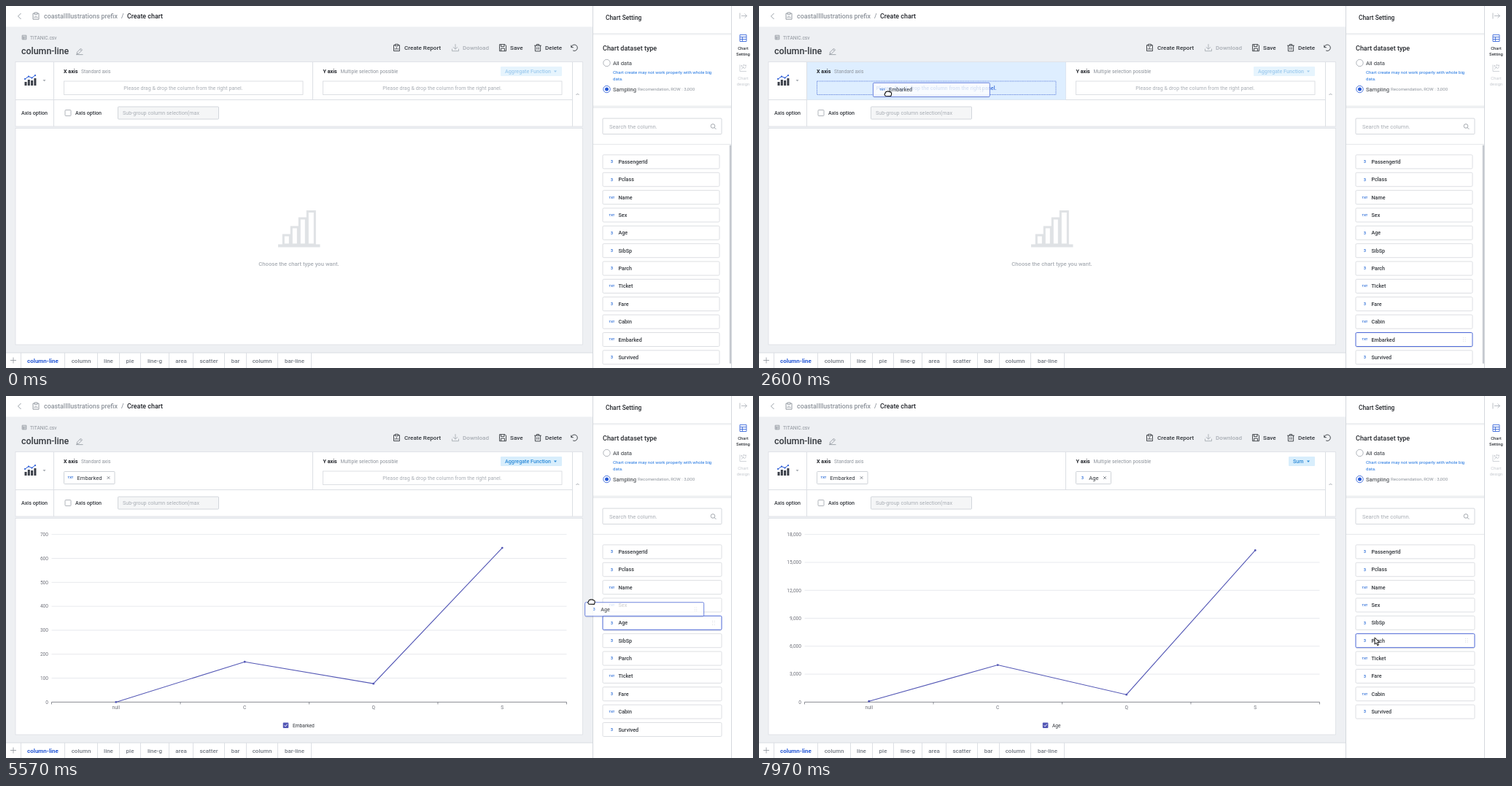
An HTML page for the animation above (8000 ms loop, 1024 by 496 pixels).

```html
<!DOCTYPE html>
<html lang="en">
<head>
<meta charset="utf-8">
<title>Create chart</title>
<style>
html, body { margin: 0; width: 100%; height: 100%; overflow: hidden; background: #fff; }
svg { display: block; width: 100%; height: 100%; font-family: Roboto, sans-serif; }
text { white-space: pre; }
</style>
</head>
<body>
<svg viewBox="0 0 1024 496">
  <g id="base"></g>
  <g id="live"></g>
</svg>
<script>
const LOOP = 8000;
const INK = '#33373d', GREY = '#8d939b', PALE = '#a9aeb5', RULE = '#dcdfe4';
const BLUE = '#2457d6', SKY = '#2b8ad8', SERIES = '#5357b5';

// Shape helpers; text is placed by the middle of its capitals.
const text = (x, cy, str, size, fill = INK, weight = 400, anchor = 'start') =>
  `<text x="${x}" y="${cy + size * 0.355}" font-size="${size}" fill="${fill}" font-weight="${weight}" text-anchor="${anchor}">${str}</text>`;
const box = (x, y, w, h, fill, stroke = 'none', rx = 0, extra = '') =>
  `<rect x="${x}" y="${y}" width="${w}" height="${h}" fill="${fill}" stroke="${stroke}" rx="${rx}" ${extra}/>`;
const path = (d, stroke = INK, width = 0.9, fill = 'none') =>
  `<path d="${d}" fill="${fill}" stroke="${stroke}" stroke-width="${width}"/>`;
const dot = (x, y, r, fill, stroke = 'none') =>
  `<circle cx="${x}" cy="${y}" r="${r}" fill="${fill}" stroke="${stroke}" stroke-width=".8"/>`;
const caret = (x, y, fill) => path(`M${x - 2} ${y - 1}h4l-2 2.4z`, 'none', 0, fill);
const at = (x, y, shapes) => `<g transform="translate(${x} ${y})">${shapes}</g>`;
const line = (x1, y1, x2, y2, stroke = RULE, width = 1) => path(`M${x1} ${y1}L${x2} ${y2}`, stroke, width);

const clipboard = c => path('M-2-3.6H-4V4.4H4V-3.6H2M-2-4.8H2V-2.5H-2zM-2 2.6V.8M0 2.6V-.6M2 2.6V1', c);
const table = (c, s) => path(`M${-s} ${-s}H${s}V${s}H${-s}zM${-s} ${-s / 3}H${s}M${-s} ${s / 3}H${s}M${-s / 4} ${-s / 3}V${s}`, c, 0.8);

function header() {
  return box(0, 0, 804, 28.5, '#fff') + path('M20.5 10L16.5 14L20.5 18', GREY)
    + at(41, 13.8, clipboard(GREY))
    + text(52, 14, 'coastalIllustrations prefix', 8.9, GREY, 500)
    + text(158, 14, '/', 8.9, GREY, 500)
    + text(166, 14, 'Create chart', 8.9, '#202329', 500)
    + at(25, 43, table(GREY, 2.8)) + text(33, 43.2, 'TITANIC.csv', 6.66, GREY)
    + text(21, 62, 'column-line', 12.4, INK, 500)
    + at(100.5, 62, path('M-3.5 3.7L-3 1.2L2-3.8L4-1.8L-1 3.2zM.8-2.6L2.8-.6M-4.5 4.6H5', GREY, 0.8))
    + at(535.5, 57.2, clipboard(INK)) + text(546, 57.2, 'Create Report', 8.1, INK, 500)
    + at(616, 57.2, path('M0-5V2M-3-1L0 2L3-1M-4.5 1.5V4.5H4.5V1.5', PALE)) + text(626, 57.2, 'Download', 8.1, PALE, 500)
    + at(681, 57.2, path('M-4.5-4.5H3L4.5-3V4.5H-4.5zM-2.5-4.5V-1.5H2V-4.5M-2.5 4.5V1H2.5V4.5')) + text(691, 57.2, 'Save', 8.1, INK, 500)
    + at(729, 57.2, path('M-4.8-3H4.8M-1.7-3V-4.6H1.7V-3M-3.6-3V4.7H3.6V-3M-1.2-.8V2.6M1.2-.8V2.6')) + text(739, 57.2, 'Delete', 8.1, INK, 500)
    + at(779, 57.2, path('M-4.2-3.5V-.5H-1.2M-4-.8A4.2 4.2 0 1 1-1.8 3.8'));
}

function axisPanel() {
  const bars = [[-7.5, 5], [-3.2, 8], [1.1, 7], [5.4, 10]]
    .map(([x, h]) => box(x, 7 - h, 3, h, '#3a3f48')).join('');
  return box(13, 76.5, 777.5, 88.5, '#fff', RULE, 0, 'stroke-width=".8"')
    + line(13, 128.5, 776.5, 128.5) + line(65.5, 76.5, 65.5, 165) + line(776.5, 76.5, 776.5, 165)
    + line(420.5, 76.5, 420.5, 128.5)
    + at(33, 102, bars + path('M-7-2L-2-5.5L2.5-3.5L7-7', BLUE, 1)
      + [[-7, -2], [-2, -5.5], [2.5, -3.5], [7, -7]].map(p => dot(...p, 1.1, BLUE)).join(''))
    + caret(52.5, 102, PALE) + path('M781.5 122L783.5 120L785.5 122', GREY, 0.8)
    + text(21, 146.7, 'Axis option', 7.17, INK, 500)
    + box(81, 142.5, 8, 8, '#fff', '#9da2aa', 1, 'stroke-width=".8"')
    + text(95, 146.7, 'Axis option', 7.17, INK, 500)
    + box(153.5, 138, 138, 17, '#f5f6f7', '#c9cdd3', 1, 'stroke-width=".8"')
    + text(160, 146.7, 'Sub-group column selection(max', 7.17, PALE);
}

function tabs() {
  const names = 'column-line,column,line,pie,line-g,area,scatter,bar,column,bar-line'.split(',');
  const edges = [20.5, 80.5, 125.5, 155.5, 184.5, 223.5, 256.5, 299.5, 329.5, 372.5, 418.5];
  return box(0, 475.5, 804, 20.5, '#fff') + line(0, 475, 804, 475)
    + path('M6 485.5H14M10 481.5V489.5', GREY, 0.8)
    + edges.map(x => line(x, 475, x, 496)).join('')
    + names.map((n, i) => text((edges[i] + edges[i + 1]) / 2, 485.7, n, 8, i ? '#777d86' : BLUE, i ? 500 : 700, 'middle')).join('');
}

function sidePanel() {
  const scatter = path('M-4.5-4.5V4.5H4.5M-2.5 2L0-1L2 1L4-2', '#c6cad0', 0.8)
    + [[-2, -3], [1, -4], [3.5, -3.5], [0, -1]].map(p => dot(...p, 1, '#c6cad0')).join('');
  return box(804.5, 0, 219.5, 496, '#fff') + line(804.5, 0, 804.5, 496, '#d4d8dd') + line(994.5, 0, 994.5, 496, '#d4d8dd')
    + text(822, 16, 'Chart Setting', 8.4, '#25282d', 500) + box(805, 37, 189, 2.5, '#eef0f2')
    + text(818, 58, 'Chart dataset type', 9, '#25282d', 500)
    + dot(823.5, 78, 4.7, '#fff', '#9da2aa') + text(832, 78, 'All data', 7.68)
    + text(832, 91, 'Chart create may not work properly with whole big', 6.1, '#1d73e0')
    + text(832, 100.3, 'data.', 6.1, '#1d73e0')
    + dot(823.5, 114, 4.7, '#fff', BLUE) + dot(823.5, 114, 2.5, BLUE)
    + text(832, 114, 'Sampling', 7.68) + text(866, 114, 'Recomendation, ROW : 3,000', 6.1, GREY)
    + box(805, 136.5, 189, 3.5, '#eef0f2')
    + box(818, 154, 163, 21.5, '#fff', '#c9cdd3', 1, 'stroke-width=".8"')
    + text(827, 165, 'Search the column.', 7.68, PALE)
    + dot(969, 164.5, 2.8, 'none', GREY) + line(971, 166.5, 973.3, 168.8, GREY, 0.9)
    + line(805, 189.5, 994, 189.5, '#e6e8eb')
    + at(1010.5, 13.5, path('M-4.5-4V4M-2.5 0H5M2-3L5 0L2 3', PALE, 0.8))
    + at(1010.5, 44, table(BLUE, 4.5))
    + text(1010.5, 57.8, 'Chart', 5.9, INK, 500, 'middle') + text(1010.5, 66, 'Setting', 5.9, INK, 500, 'middle')
    + at(1010.5, 85, scatter)
    + text(1010.5, 99, 'Chart', 5.9, '#c6cad0', 400, 'middle') + text(1010.5, 107, 'design', 5.9, '#c6cad0', 400, 'middle');
}

document.getElementById('base').innerHTML = box(0, 0, 1024, 496, '#eef0f3') + header() + axisPanel()
  + box(13, 167.5, 777.5, 296.5, '#fff', RULE, 0, 'stroke-width=".8"') + tabs() + sidePanel();

// Timeline in ms.
const X_DROP = 3450, Y_DROP = 6380;
const DRAGS = [
  { from: 1700, over: 2250, to: X_DROP, name: 'Embarked', w: 160, dx: 21, dy: 15 },
  { from: 5450, over: 5880, to: Y_DROP, name: 'Age', w: 163, dx: 30, dy: 15 }
];
const CHARTS = [
  { start: 3750, name: 'Embarked', step: 100, count: 7, values: [0, 168, 77, 644], key: 379.7, label: 393 },
  { start: 6413, name: 'Age', step: 3000, count: 6, values: [90, 3985, 800, 16300], key: 388.8, label: 402 }
];
const HOVER = [[0, -1], [1250, 10], [4100, -1], [4650, 3], [5150, 4], [7600, 5]];
const TRACK = [
  [900, 905, 400], [1350, 836, 456], [1700, 839, 462], [1837, 674, 339], [1870, 617, 304],
  [2150, 230, 136], [2350, 180, 122], [2600, 177, 120], [3450, 168, 118], [3900, 165, 115],
  [4300, 500, 210], [4600, 800, 280], [4800, 846, 288], [4900, 846, 288], [5150, 847, 302],
  [5300, 848, 316], [5500, 848, 316], [5700, 720, 220], [5850, 550, 130], [5900, 529, 118],
  [5930, 529, 118], [6380, 522, 116], [6830, 517, 114], [7000, 517, 114], [7350, 800, 290],
  [7500, 840, 312], [7750, 844, 328], [7970, 844, 331]
];
const COLUMNS = ['PassengerId', 'Pclass', 'Name', 'Sex', 'Age', 'SibSp', 'Parch', 'Ticket', 'Fare', 'Cabin', 'Embarked', 'Survived'];
const isText = name => ['Name', 'Sex', 'Ticket', 'Cabin', 'Embarked'].includes(name);

function pointer(t) {
  const i = TRACK.findIndex(k => k[0] > t);
  if (i < 0) return TRACK[TRACK.length - 1].slice(1);
  if (!i) return TRACK[0].slice(1);
  const [a, b] = [TRACK[i - 1], TRACK[i]], p = (t - a[0]) / (b[0] - a[0]);
  return [a[1] + (b[1] - a[1]) * p, a[2] + (b[2] - a[2]) * p];
}

const typeMark = (x, cy, name) => isText(name)
  ? text(x, cy, 'TXT', 4.2, '#2f6fd8', 700, 'middle') : text(x, cy, '3', 5.2, '#2f6fd8', 700, 'middle');

function row(x, cy, w, name, active) {
  let grip = '';
  if (active) for (let i = 0; i < 6; i++) grip += dot(x + w - 12.5 + (i % 2) * 2.6, cy - 2.4 + (i >> 1) * 2.4, 0.45, '#b5bac2');
  return (active ? box(x, cy - 8, w, 19.5, '#000', 'none', 2, 'opacity=".07"') : '')
    + box(x, cy - 9.5, w, 19, '#fff', active ? '#4a66d6' : '#d3d6db', 1.5, `stroke-width="${active ? 1 : 0.8}"`)
    + typeMark(x + 12.5, cy, name) + text(x + 21.5, cy, name, 7.17, INK, 500) + grip;
}

function columnList(t) {
  const hover = HOVER.filter(h => h[0] <= t).pop()[1];
  const left = COLUMNS.filter(c => !(t >= X_DROP && c === 'Embarked') && !(t >= Y_DROP && c === 'Age'));
  return left.map((c, i) => row(818, 213.4 + i * 24.36, t < X_DROP ? 160 : 163, c, i === hover)).join('')
    + (t < X_DROP ? box(991.8, 190.5, 2.2, 299.5, '#c5c9cf', 'none', 1) : '');
}

function dropZone(x, chosen, over) {
  if (chosen) {
    const w = chosen === 'Age' ? 48 : 69.5;
    return box(x + 0.5, 103.5, w, 17, '#fff', '#c3c8cf', 1, 'stroke-width=".8"')
      + typeMark(x + 9.5, 112, chosen) + text(x + 18.3, 112, chosen, 7.68)
      + at(x + w - 8, 112, path('M-1.8-1.8L1.8 1.8M1.8-1.8L-1.8 1.8', '#666c75', 0.8));
  }
  return box(x + 0.5, 103, 327.5, 18.5, over ? 'none' : '#fff', over ? '#6b8ce0' : '#d5d8dd', 0, over ? 'stroke-width=".9" stroke-dasharray="1.5 .8"' : 'stroke-width=".8"')
    + text(x + 164, 112.3, 'Please drag &amp; drop the column from the right panel.', 7.17, over ? '#3a6fd8' : PALE, over ? 500 : 400, 'middle');
}

function axes(t) {
  const [overX, overY] = DRAGS.map(d => t >= d.over && t < d.to);
  const sum = t >= Y_DROP, enabled = t >= X_DROP;
  const tint = enabled ? SKY : '#9fcbee', left = sum ? 726 : 678;
  return (overX ? box(66, 77, 354.5, 51.5, '#deeeff') : '') + (overY ? box(421, 77, 355.5, 51.5, '#deeeff') : '')
    + text(79, 89.6, 'X axis', 7.17, '#202329', 700) + text(103, 89.6, 'Standard axis', 6.66, GREY)
    + text(434.5, 89.6, 'Y axis', 7.17, '#202329', 700) + text(458.5, 89.6, 'Multiple selection possible', 6.66, GREY)
    + box(left, 83, 762 - left, 13, enabled ? '#d8eefc' : '#e6f4fd', 'none', 1)
    + text(left + 6, 89.6, sum ? 'Sum' : 'Aggregate Function', 7.17, tint, 500) + caret(753, 89.5, tint)
    + dropZone(79, t >= X_DROP && 'Embarked', overX) + dropZone(434, sum && 'Age', overY);
}

function emptyChart() {
  const tops = [314, 303, 291, 281.5];
  return box(373, 326.5, 57.5, 4, '#dfe2e5')
    + tops.map((y, i) => box(380.3 + i * 11, y, 9 + (i === 3 ? 1 : 0), 327 - y, '#fff', '#dfe2e5', 0, 'stroke-width="3"')).join('')
    + text(401.5, 353.2, 'Choose the chart type you want.', 7.7, PALE, 500, 'middle');
}

function chart(t) {
  const c = CHARTS.filter(k => t >= k.start).pop();
  if (!c) return emptyChart();
  const x0 = 62.5, width = 706, y0 = 419.4, height = 229.7;
  const done = Math.min(1, (t - c.start) / 1000);
  let out = '';
  for (let i = 0; i <= c.count; i++) {
    const y = y0 - height * i / c.count;
    if (i) out += line(x0, y, x0 + width, y, '#e1e4e9', 0.8);
    out += text(58, y, (i * c.step).toLocaleString('en-US'), 6.6, '#6e7079', 400, 'end');
  }
  out += line(x0, y0, x0 + width, y0, '#6e7079', 0.8);
  for (let i = 0; i < 5; i++) out += line(x0 + width * i / 4, y0, x0 + width * i / 4, y0 + 3, '#6e7079', 0.8);
  const points = c.values.map((v, i) => [x0 + width * (i + 0.5) / 4, y0 - height * v / (c.step * c.count)]);
  ['null', 'C', 'Q', 'S'].forEach((s, i) => out += text(points[i][0], 427, s, 6.6, '#6e7079', 400, 'middle'));
  out += `<clipPath id="reveal">${box(x0, 170, width * done, 255, '#000')}</clipPath>`
    + `<g clip-path="url(#reveal)">${path('M' + points.map(p => p.join(' ')).join('L'), SERIES, 1.1)}</g>`;
  points.forEach(([x, y]) => {
    const age = t - c.start - 1000 * (x - x0) / width;
    const r = 1.4 * Math.max(0, Math.min(1, age / 200));
    if (r) out += dot(x, y, r, SERIES);
  });
  return out + box(c.key, 447.4, 7.6, 7.6, SERIES, 'none', 1)
    + at(c.key + 3.8, 451.2, path('M-2 0L-.5 1.6L2.2-1.6', '#fff', 1)) + text(c.label, 451.2, c.name, 6.66);
}

function cursor(t, drag) {
  if (t < TRACK[0][0]) return '';
  const [x, y] = pointer(t);
  if (drag) return at(x, y, path('M-3.6 3.2C-5.5 1.5-5 .2-3.8-.4C-4-2.3-2.6-2.9-1.7-2.4C-1.2-3.5.2-3.4.7-2.6C1.6-3.3 2.6-2.7 2.8-1.9C4.2-2.2 4.8-1 4.6.5C4.5 2 4 2.6 3.7 3.5z', '#111', 1.1, '#fff'));
  return at(x, y, path('M0 0V9.2L2.2 7.2L3.8 10.8L5.4 10.1L3.8 6.6H6.8z', '#111', 1, '#fff'));
}

function scene(t) {
  const drag = DRAGS.find(d => t >= d.from && t < d.to);
  let carried = '';
  if (drag) {
    // The carried column trails the hand by one screen update.
    const [x, y] = pointer(Math.max(drag.from, t - 33));
    carried = `<g opacity=".8">${row(x - drag.dx, y - drag.dy + 9.5, drag.w, drag.name, true)}</g>`;
  }
  return axes(t) + chart(t) + columnList(t) + carried + cursor(t, drag);
}

const live = document.getElementById('live');
const began = performance.now();
let shown = '';
function tick() {
  const next = scene((performance.now() - began) % LOOP);
  if (next !== shown) live.innerHTML = shown = next;
  requestAnimationFrame(tick);
}
tick();
</script>
</body>
</html>
```
